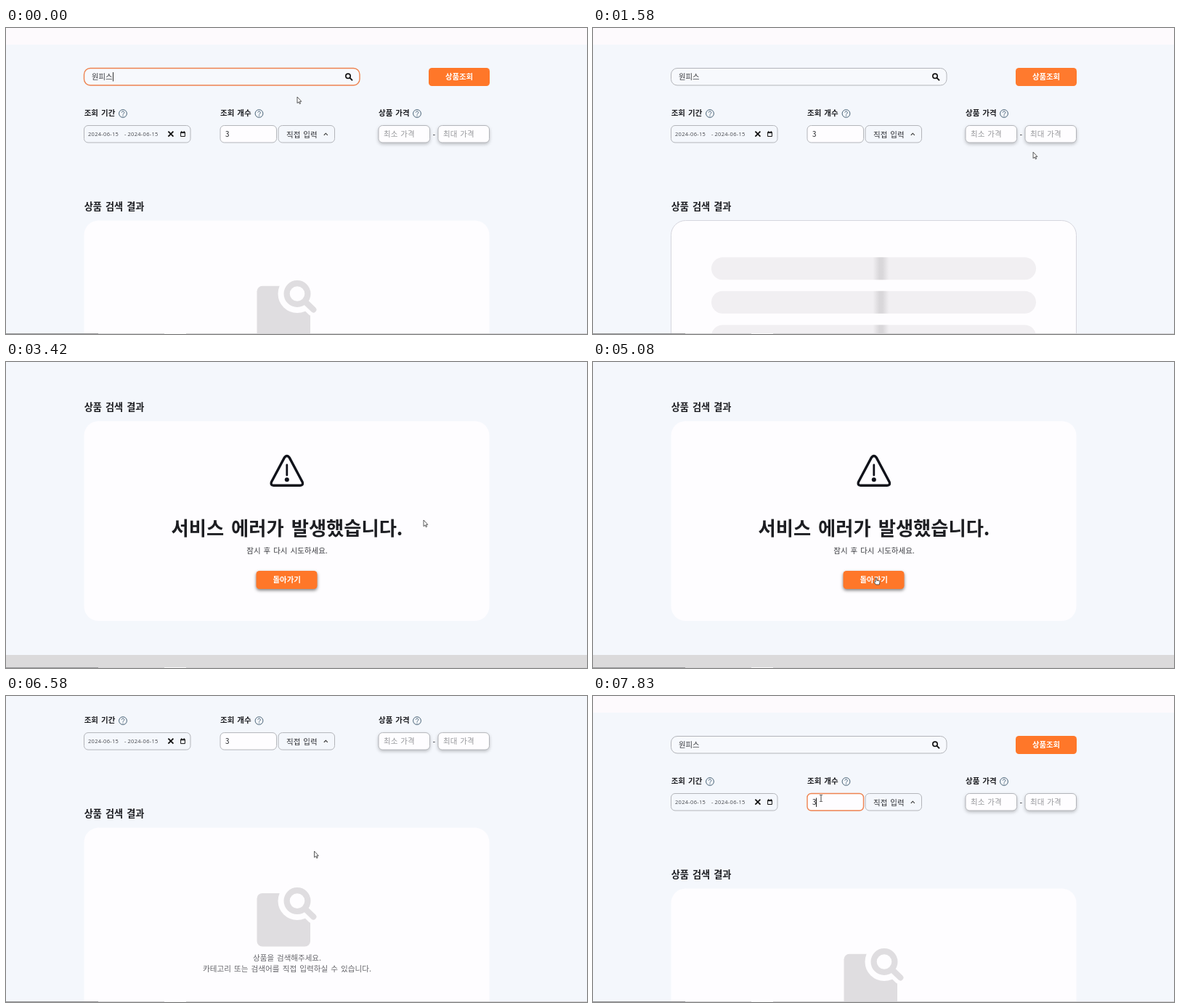
Write an HTML page that moves like this. It is 800 by 422 pixels and loops after 8 s.

```html
<!DOCTYPE html>
<html lang="ko">
<head>
<meta charset="utf-8">
<style>
html, body { margin: 0; width: 100%; height: 100%; overflow: hidden; background: #f4f7fc; }
svg { display: block; width: 800px; height: 422px; }
text { font-family: 'Noto Sans CJK KR', 'Noto Sans KR', 'Noto Sans CJK', sans-serif; word-spacing: .1em; }
.date { font-family: 'Open Sans', sans-serif; letter-spacing: .3px; }
.lift { filter: drop-shadow(0 2px 2px rgba(0, 0, 0, .22)); }
.press { filter: drop-shadow(0 2px 2px rgba(0, 0, 0, .5)); }
</style>
</head>
<body>
<svg id="stage" viewBox="0 0 800 422" xmlns="http://www.w3.org/2000/svg"></svg>
<script>
const LOOP = 8000, ORANGE = '#ff7729', INK = '#1d1e22', CARD = '#fefdff', GREY = '#dfdde0', LINE = '#b3b5ba';

// Text whose Hangul is centred on height cy
const label = (x, cy, size, str, { fill = INK, weight = 400, anchor = 'start', cls = '' } = {}) =>
  `<text x="${x}" y="${cy + size * .37}" font-size="${size}" font-weight="${weight}" fill="${fill}" text-anchor="${anchor}" class="${cls}">${str}</text>`;
const box = (x, y, w, h, r, fill, more = '') =>
  `<rect x="${x}" y="${y}" width="${w}" height="${h}" rx="${r}" fill="${fill}" ${more}/>`;
const field = (x, y, w, h, fill, more = '') => box(x, y, w, h, 5.5, fill, `stroke="${LINE}" ${more}`);
const path = (d, color, width, more = '') =>
  `<path d="${d}" fill="none" stroke="${color}" stroke-width="${width}" ${more}/>`;
const ROUND = 'stroke-linecap="round" stroke-linejoin="round"';

const help = x => `<circle cx="${x}" cy="118" r="5.4" fill="none" stroke="#4b6579"/>` +
  path(`M${x - 1.7} 116.6a1.75 1.75 0 1 1 2.7 1.5q-1 .6 -1 1.5`, '#4b6579', 1) +
  `<circle cx="${x}" cy="121.2" r=".65" fill="#4b6579"/>`;

const bold = { weight: 700 }, mid = { anchor: 'middle' };
const white = { weight: 700, anchor: 'middle', fill: '#fff' };
const date = { cls: 'date', fill: '#44464b' };
const hint = { fill: '#96979b' };

const form =
  box(0, 0, 800, 23, 0, '#fdfafd') +
  box(107.5, 55.5, 379.5, 23.5, 8.5, '#f7f9fd', `id="search" stroke="${LINE}"`) +
  label(118, 67, 10.4, '원피스', { fill: '#3a3b3f' }) +
  path('M147.5 61V73.5', '#333', 1, 'id="searchCaret"') +
  `<circle cx="471" cy="66.3" r="3.2" fill="none" stroke="#111" stroke-width="1.6"/>` +
  path('M473.4 68.7L477 72.3', '#111', 1.9) +
  box(582, 55, 84, 25, 4.5, ORANGE) +
  `<g clip-path="url(#btn)"><circle id="ripple" cx="623.5" cy="68" fill="#fff"/></g>` +
  label(624, 67.5, 10.4, '상품조회', white) +
  label(107.7, 117, 10.5, '조회 기간', bold) + help(161) +
  label(295, 117, 10.5, '조회 개수', bold) + help(348.5) +
  label(513, 117, 10.5, '상품 가격', bold) + help(566) +
  field(107.5, 134.5, 146.5, 23.5, '#f4f7fc') +
  label(113, 146.3, 7.5, '2024-06-15', date) +
  label(163, 146.3, 7.5, '-', date) +
  label(167.5, 146.3, 7.5, '2024-06-15', date) +
  path('M223.4 142.6l7 7m0 -7l-7 7', '#111', 1.8) +
  path('M240.6 144.3h5.8v5.2h-5.8zM241.8 142v2M245.2 142v2', '#111', 1) +
  path('M240.2 144.2h6.6', '#111', 1.8) +
  field(295, 134.5, 77.5, 23.5, CARD, 'id="count"') +
  label(302, 146.6, 9.8, '3') +
  path('M307.5 140.5V153', '#222', 1, 'id="countCaret"') +
  field(375, 134.5, 77.5, 23.5, '#f4f7fc') +
  label(386, 146.8, 10.5, '직접 입력', { fill: '#303136' }) +
  path('M437.8 147.8l2.5 -2.6l2.5 2.6', '#333', 1.1) +
  field(513, 134.5, 70.5, 23.5, CARD, 'class="lift"') +
  label(520, 146.3, 10.5, '최소 가격', hint) +
  label(589.3, 147, 10.5, '-', mid) +
  field(595, 134.5, 70.5, 23.5, CARD, 'class="lift"') +
  label(602, 146.3, 10.5, '최대 가격', hint) +
  label(107.7, 246.3, 13.2, '상품 검색 결과', bold);

const soft = { anchor: 'middle', weight: 500, fill: '#66666b' };
const empty =
  box(345.5, 355.8, 73.5, 73.5, 7.5, GREY) +
  `<circle cx="401" cy="366.5" r="26.5" fill="${CARD}"/>` +
  path('M401 366.5L423.5 388.5', CARD, 19, ROUND) +
  `<circle cx="401" cy="366.5" r="14.4" fill="none" stroke="${GREY}" stroke-width="8.2"/>` +
  path('M411.5 377L423.3 388.4', GREY, 8.2, ROUND) +
  label(387, 445, 10.5, '상품을 검색해주세요.', soft) +
  label(387, 459.5, 10.6, '카테고리 또는 검색어를 직접 입력하실 수 있습니다.', soft);

const error =
  path('M383.2 316.1Q386.8 311 390.4 316.1L408 349.2Q410 354 405 354.3H368.6Q363.6 354 365.6 349.2Z', '#10121a', 3.4, ROUND) +
  path('M386.8 326V340', '#10121a', 2.8, ROUND) +
  `<circle cx="386.8" cy="346.3" r="3" fill="#10121a"/>` +
  label(387, 413.5, 26.3, '서비스 에러가 발생했습니다.', { weight: 700, anchor: 'middle' }) +
  label(387, 444.5, 10.5, '잠시 후 다시 시도하세요.', { anchor: 'middle', fill: '#3c3d42' }) +
  box(344.5, 472, 84, 25, 4.5, ORANGE, 'class="press"') +
  label(386.7, 484.2, 10.5, '돌아가기', white);

const bars = fill => [0, 1, 2, 3].map(i => box(163, 316.2 + 46.6 * i, 447, 31, 15.5, fill)).join('');
const loading = bars('#f1eff2') +
  `<g clip-path="url(#bars)"><rect id="shine" y="310" width="22" height="180" fill="url(#glow)"/></g>`;

const cursors =
  `<path id="arrow" d="M0 0V8.6L2 6.9L3.3 9.7L4.6 9.1L3.3 6.3H5.8Z" fill="#fff" stroke="#333" stroke-width=".8"/>` +
  `<path id="beam" d="M-1.8 -4.5H-.5L0 -4L.5 -4.5H1.8M0 -4V4M-1.8 4.5H-.5L0 4L.5 4.5H1.8" fill="none" stroke="#333" stroke-width=".9"/>` +
  `<path id="hand" d="M-.8 .6Q0 -.6 .8 .6V3.6L4.4 4.4Q5.2 4.6 5 5.6L4.4 9.4H-.4L-3 6Q-3 4.8 -1.8 5.2L-.8 6Z" fill="#fff" stroke="#333" stroke-width=".8"/>`;

document.getElementById('stage').innerHTML = `
<defs>
  <clipPath id="btn">${box(582, 55, 84, 25, 4.5, '#000')}</clipPath>
  <clipPath id="bars">${bars('#000')}</clipPath>
  <linearGradient id="glow">
    <stop offset="0" stop-color="#d9d7da" stop-opacity="0"/>
    <stop offset=".4" stop-color="#d9d7da"/><stop offset=".6" stop-color="#d9d7da"/>
    <stop offset="1" stop-color="#d9d7da" stop-opacity="0"/>
  </linearGradient>
</defs>
${box(0, 0, 800, 422, 0, '#f4f7fc')}
<g id="page">${form}
  ${box(107.5, 265.5, 558, 275.5, 20, CARD, 'id="card"')}
  <g id="empty">${empty}</g><g id="error">${error}</g><g id="loading">${loading}</g>
  ${box(0, 588, 800, 60, 0, '#dbdadb', 'id="footer"')}
</g>
${box(0, 421, 800, 1, 0, '#d3d2d4')}${box(0, 421, 127, 1, 0, '#98989a')}${box(218, 421, 30, 1, 0, '#fafafa')}
<g id="cursor">${cursors}</g>`;

const el = id => document.getElementById(id);
const show = (id, on) => el(id).setAttribute('display', on ? 'inline' : 'none');
const set = (id, name, value) => el(id).setAttribute(name, value);
const clamp = v => Math.max(0, Math.min(1, v));
const smooth = v => v * v * (3 - 2 * v);

// Eased path through rows of [time, ...values]
function track(rows, t) {
  const i = rows.findIndex(r => r[0] > t);
  if (i < 0) return rows[rows.length - 1].slice(1);
  if (i === 0) return rows[0].slice(1);
  const a = rows[i - 1], b = rows[i], k = smooth((t - a[0]) / (b[0] - a[0]));
  return a.slice(1).map((v, n) => v + (b[n + 1] - v) * k);
}
const step = (rows, t) => rows.filter(r => r[0] <= t).pop()[1];

const SCROLL = [[0, 0], [1650, 0], [2350, 184], [6284, 184], [6845, 0]];
const POINTER = [
  [0, 401, 95], [80, 401, 95], [300, 440, 112], [830, 626, 67], [1169, 626, 67],
  [1170, 611, 147], [2000, 601, 196], [2080, 601, 196], [2670, 575, 218], [3670, 575, 218],
  [4420, 409, 296], [4500, 402, 294], [4920, 402, 294], [5170, 385, 299], [5650, 385, 299],
  [6250, 418, 216], [6330, 418, 216], [6830, 431, 212], [7580, 314, 141]
];
const SHAPE = [[0, 'arrow'], [700, 'hand'], [1170, 'beam'], [1420, 'arrow'], [4330, 'hand'],
  [5500, 'arrow'], [7430, 'beam']];
const STATE = [[0, 'empty'], [1170, 'loading'], [3420, 'error'], [5500, 'empty']];

function outline(id, on) {
  set(id, 'stroke', on ? '#ee8350' : LINE);
  set(id, 'stroke-width', on ? 1.4 : 1);
}

function draw(t) {
  const state = step(STATE, t), shape = step(SHAPE, t), [x, y] = track(POINTER, t);
  set('page', 'transform', `translate(0 ${-track(SCROLL, t)[0]})`);
  for (const s of ['empty', 'loading', 'error']) show(s, s === state);
  show('footer', state !== 'loading');
  set('card', 'stroke', state === 'loading' ? '#d6d6de' : 'none');
  set('shine', 'x', 226 + (t - 1170) * .388);

  const searching = t < 790, counting = t >= 7540;
  outline('search', searching);
  outline('count', counting);
  show('searchCaret', searching && t < 580);
  show('countCaret', counting);

  const k = clamp((t - 1170) / 450);
  set('ripple', 'r', 26.5 + 17 * k);
  set('ripple', 'opacity', t < 1170 ? 0 : .28 * (1 - k));

  set('cursor', 'transform', `translate(${x} ${y})`);
  for (const c of ['arrow', 'beam', 'hand']) show(c, c === shape);
}

const start = performance.now();
function tick() {
  draw((performance.now() - start) % LOOP);
  requestAnimationFrame(tick);
}
tick();
</script>
</body>
</html>
```
